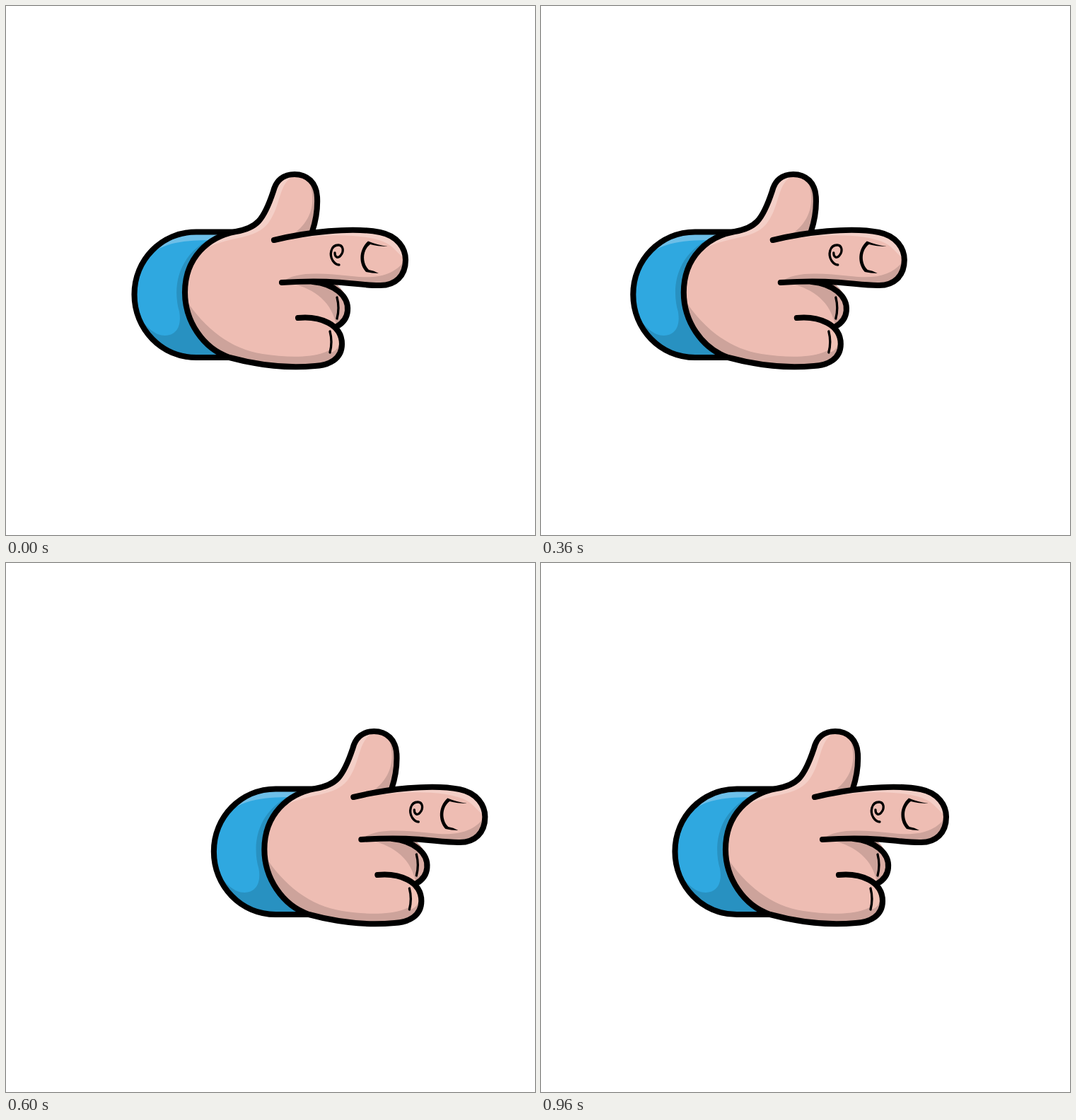
Animation, 748 px wide and 748 px high, one loop 1 s. Source, as an HTML page:

```html
<!DOCTYPE html>
<html lang="en">
<head>
<meta charset="utf-8">
<title>Pointing hand</title>
<style>
  html, body { margin: 0; width: 100%; height: 100%; overflow: hidden; background: #fff; }
  svg { display: block; width: 100vw; height: 100vh; }
  .line { fill: none; stroke: #000; stroke-width: 8.1; stroke-linecap: round; stroke-linejoin: round; }
  .thin { stroke-width: 3.3; }
  .skin { fill: #eebdb3; }
  .shade { fill: #cda39b; }
  .glow { fill: #f4cfc7; }
</style>
</head>
<body>
<svg viewBox="1 0 748 748">
  <defs>
    <path id="cuff" d="M335 319.5H270C221 319.5 182.500 359 182.500 408S221 497 270 497H320"/>
    <path id="body" d="M326 319C355 314 365 304 379 262C383 246 394 238 409 238C427 238 440 250 441 270C442 290 439 304 434 319C475 314 508 315 530 320C555 326 566 343 566 359C566 381 552 396 528 395C505 394 490 392 465 391C480 402 485 416 484 431C483 443 476 449 469 453C474 460 476 468 476 478C476 499 458 508 438 509C395 513 350 506 317 497C279 484 254 445 254 405C254 355 288 326 326 319Z"/>
    <clipPath id="inCuff"><use href="#cuff"/></clipPath>
    <clipPath id="inBody"><use href="#body"/></clipPath>
  </defs>
  <g id="hand">
    <g clip-path="url(#inCuff)">
      <path fill="#2fa8e0" d="M175 310H340V505H175Z"/>
      <path fill="#2891c1" d="M292 328C238 355 238 405 246 432C250 455 240 466 226 466C211 466 202 455 186 438L200 505H340V330Z"/>
      <path fill="#6dbfe8" d="M196 360C222 330 262 331 310 331V315H250C220 322 205 340 196 360Z"/>
    </g>
    <use href="#cuff" class="line"/>

    <use href="#body" class="skin"/>
    <g clip-path="url(#inBody)">
      <path class="glow" d="M285 342C320 325 353 330 371 308C391 282 385 252 408 240L385 232L355 300L280 325Z"/>
      <path class="glow" d="M415 328C465 321 513 324 534 333C549 339 555 350 566 359L555 312H440Z"/>
      <path class="shade" d="M425 238C438 262 443 300 402 326L436 321L460 270L440 240Z"/>
      <path class="shade" d="M391 391C410 374 450 378 490 382C530 387 554 378 567 356V400H450Z"/>
      <path class="shade" d="M400 391C432 398 459 414 467 447L471 455L492 440V390Z"/>
      <path fill="#dcaea5" d="M470 411Q474 427 470 443L481 441Q488 424 478 407Z"/>
      <path class="shade" d="M252 410C280 455 318 485 364 492C410 499 462 499 477 469V516H330L250 470Z"/>
      <path fill="#f1c2b6" d="M460 460Q464 475 460 490Q476 486 473 462Z"/>
    </g>

    <g class="line">
      <path d="M434 319C439 304 442 290 441 270C440 250 427 238 409 238C394 238 383 246 379 262C365 304 355 314 326 319C288 326 254 355 254 405C254 445 279 484 317 497C350 506 395 513 438 509C458 508 476 499 476 478C476 450 445 438 414 441"/>
      <path d="M380 331C425 320 490 312 530 320C555 325 566 343 566 359C566 381 552 396 528 395C495 395 470 386 391 391"/>
      <path d="M435 390C465 393 486 410 484 431C483 443 476 449 469 453"/>
    </g>
    <g class="line thin">
      <path d="M469 412Q473 427 469 442M459 460Q463 475 459 490"/>
      <path d="M466 349C466 356 471 357 474 353C480 346 477 338 471 338C460 338 458 352 463 360Q467 366 472 366"/>
    </g>
    <path d="M541 340Q526 340 516 337C505 345 504 363 514 373Q521 374 528 378Q518 378 510 376C499 364 500 344 513 332.500Q526 338 541 340Z"/>
  </g>
</svg>
<script>
const hand = document.getElementById('hand');
const LOOP = 1000, STEP = 40;

// start time, end time, start x, end x, horizontal handles of the easing curve
const moves = [
  [0, 260, 0, -148.5, 0.88, 0.74],
  [260, 740, -148.5, 125, 0.243, 0.132],
  [740, 1000, 125, 0, 1 / 3, 2 / 3]
];

// cubic-bezier(a, 0, b, 1)
function ease(x, a, b) {
  let lo = 0, hi = 1, s = 0.5;
  for (let i = 0; i < 30; i++) {
    s = (lo + hi) / 2;
    const r = 1 - s;
    if (3 * a * s * r * r + 3 * b * s * s * r + s ** 3 < x) lo = s;
    else hi = s;
  }
  return s * s * (3 - 2 * s);
}

function offset(t) {
  const [t0, t1, x0, x1, a, b] = moves.find(m => t < m[1]);
  return x0 + (x1 - x0) * ease((t - t0) / (t1 - t0), a, b);
}

const start = performance.now();
function draw(now) {
  const t = Math.max(0, now - start) % LOOP;
  const x = offset(Math.floor(t / STEP) * STEP);
  hand.setAttribute('transform', `translate(${x.toFixed(2)} 0)`);
  requestAnimationFrame(draw);
}
draw(start);
</script>
</body>
</html>
```
